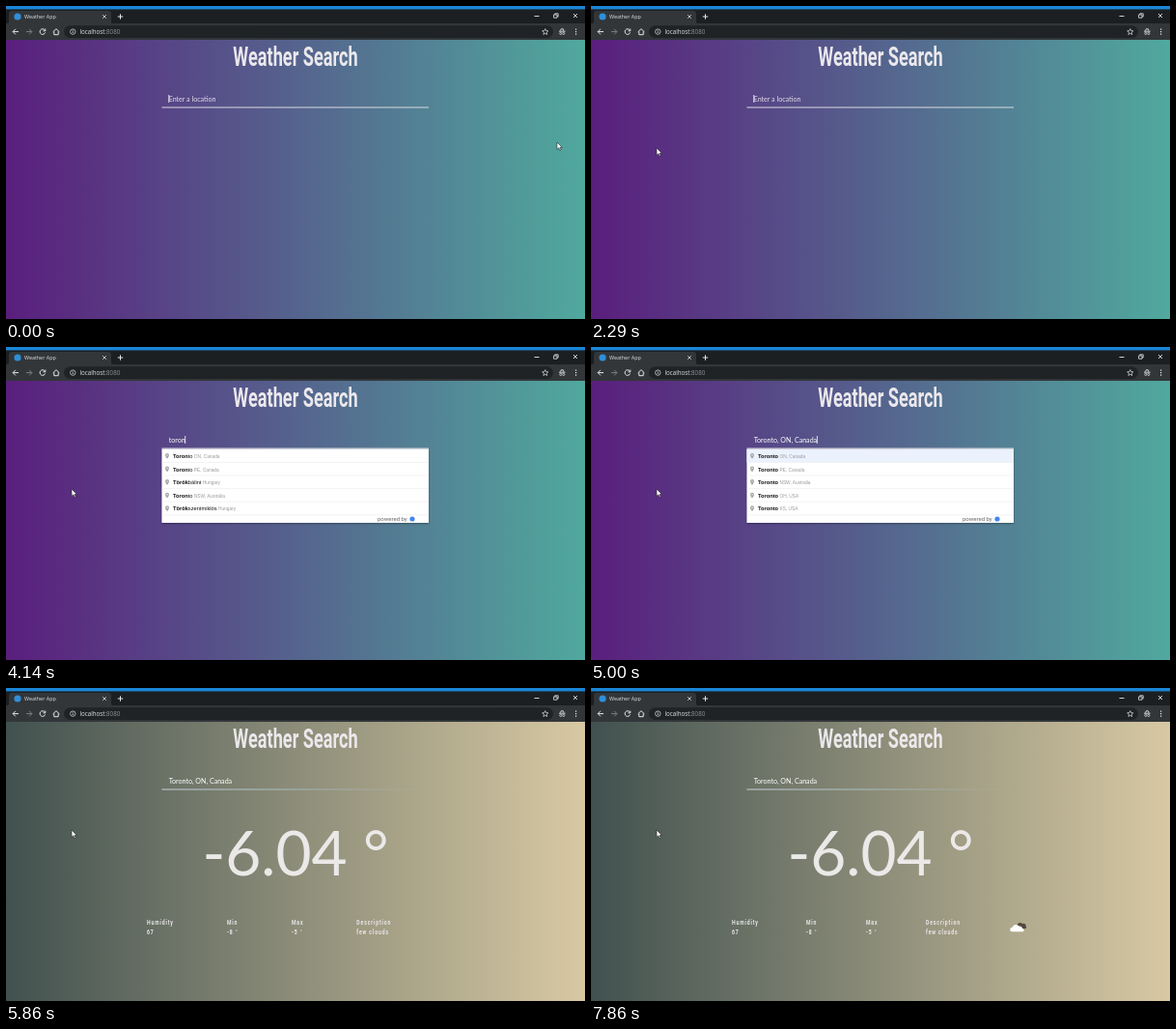
These frames come from a looping animation (600 by 324 pixels, 8 s). An HTML page:

```html
<!DOCTYPE html>
<html lang="en">
<head>
<meta charset="utf-8">
<title>Weather App</title>
<style>
html, body { margin: 0; width: 100%; height: 100%; overflow: hidden; background: #1c2023; }
svg { display: block; width: 100%; height: 100%; }
text { white-space: pre; }
.lato { font-family: Lato, sans-serif; fill: #fff; }
.ui { font-family: "Open Sans", sans-serif; fill: #dfe1e4; }
.list { font-family: "Liberation Sans", Arial, sans-serif; font-size: 5.7px; fill: #111; }
.list .hit { font-weight: 700; }
.list .more { font-size: 4.8px; fill: #999; }
.slim { font-family: Roboto, sans-serif; font-weight: 700; fill: #ebe8ec; }
.icon { fill: none; stroke: #e4e6e8; stroke-width: 1; }
</style>
</head>
<body>
<svg viewBox="0 0 600 324" preserveAspectRatio="none">
  <defs>
    <linearGradient id="dusk"><stop stop-color="#5a1e7d"/><stop offset="1" stop-color="#50a99e"/></linearGradient>
    <linearGradient id="sand"><stop stop-color="#41514f"/><stop offset="1" stop-color="#d8c9a3"/></linearGradient>
    <linearGradient id="rule" gradientUnits="userSpaceOnUse" x1="161" y1="0" x2="438" y2="0">
      <stop stop-color="#c6d2d6"/><stop offset=".45" stop-color="#a9bcc2"/><stop offset="1" stop-color="#a9bcc2" stop-opacity="0"/>
    </linearGradient>
    <filter id="shade" x="-5%" y="-10%" width="110%" height="125%">
      <feDropShadow dx="0" dy="1" stdDeviation="1" flood-opacity=".35"/>
    </filter>
  </defs>

  <rect id="page" y="34" width="600" height="290" fill="url(#dusk)"/>

  <!-- browser frame -->
  <rect width="600" height="19" fill="#1b1f22"/>
  <rect width="600" height="3.4" fill="#1b86d6"/>
  <path d="M1 18.5Q3 18 3 16V8Q3 5 6 5H106Q109 5 109 8V16Q109 18 111 18.5Z" fill="#323639"/>
  <rect y="18" width="600" height="17" fill="#323639"/>
  <rect x="60" y="20.3" width="507" height="12.6" rx="6.3" fill="#202326"/>
  <circle cx="12" cy="11" r="3.6" fill="#2f8fd8"/>
  <text class="ui" x="19" y="13" font-size="5.4">Weather App</text>
  <text class="ui" x="76.5" y="29" font-size="6.2">localhost<tspan fill="#8d9296">:8080</tspan></text>
  <g class="icon">
    <path d="M100.2 9.2l3.6 3.6m0-3.6l-3.6 3.6" stroke-width=".8"/>
    <path d="M118.5 8.3v5.4m-2.7-2.7h5.4"/>
    <path d="M547.5 10.5h5" stroke-width=".9"/>
    <path d="M567.6 9h3.4v3.2h-3.4zM568.8 9V7.8h3.4V11H571" stroke-width=".8"/>
    <path d="M588 8l4 4m0-4l-4 4" stroke-width=".9"/>
    <path d="M13 26.6H7.2m2.7-2.8l-2.8 2.8 2.8 2.8"/>
    <path d="M21 26.6h5.8m-2.7-2.8l2.8 2.8-2.8 2.8" stroke="#7d8185"/>
    <path d="M40.1 24.8A2.8 2.8 0 1 0 40.6 27.4M40.8 23.6v2.2h-2.3"/>
    <path d="M48.6 26.9l3.4-3.2 3.4 3.2M49.8 26.4v3.3h4.4v-3.3"/>
    <circle cx="69.3" cy="26.6" r="2.7" stroke-width=".7"/>
    <path d="M69.3 26.2v1.8m0-3.2v.8" stroke-width=".8"/>
    <path d="M558.8 23.6l.9 2 2.2.2-1.7 1.5.5 2.2-1.9-1.2-1.9 1.2.5-2.2-1.7-1.5 2.2-.2z" stroke-width=".7"/>
    <path d="M573 26.2h6.6M574.6 25.6l.6-1.8h2.2l.6 1.8" stroke-width=".9"/>
    <circle cx="574.8" cy="28.4" r="1.1" stroke-width=".7"/>
    <circle cx="577.8" cy="28.4" r="1.1" stroke-width=".7"/>
    <path d="M590.6 23.6v1.2m0 1.3v1.2m0 1.3v1.2" stroke-width="1.2"/>
  </g>

  <g transform="translate(300 62) scale(.673 1)">
    <text class="slim" text-anchor="middle" font-size="27">Weather Search</text>
  </g>

  <rect id="line" x="161.5" y="104.5" width="276.5" height="1" fill="#d9d9e2"/>
  <text id="entry" class="lato" x="168.7" y="98.6" font-size="7.1"></text>
  <rect id="caret" y="92" width=".8" height="8" fill="#fff"/>

  <g id="drop">
    <rect x="161.5" y="105.5" width="276.5" height="76.5" fill="#fff" filter="url(#shade)"/>
    <rect id="pick" x="161.5" y="106" width="276.5" height="13.4" fill="#ebf2fe"/>
    <g id="rows"></g>
    <text x="385" y="180.2" font-size="6" font-family="Roboto, sans-serif" fill="#666">powered by</text>
    <circle cx="421" cy="178" r="2.6" fill="#4285f4"/>
  </g>

  <g id="report">
    <text class="lato" x="300" y="193.5" text-anchor="middle" font-size="64" style="fill:#ebe9e8">-6.04 °</text>
    <g id="facts"></g>
    <g id="cloud">
      <path d="M441 249a2.6 2.6 0 0 1 1-4.3 3 3 0 0 1 5-.6 2.3 2.3 0 0 1 3.6 2.2 2 2 0 0 1-.8 3z" fill="#53473f"/>
      <path d="M436.4 252.3a2.2 2.2 0 0 1 .2-4.5 4 4 0 0 1 7-1.2 2.6 2.6 0 0 1 3.4 2.2 1.8 1.8 0 0 1 .4 3.5z" fill="#fff"/>
    </g>
  </g>

  <path id="mouse" d="M0 0V7.4L1.8 5.8 3 8.6 4.2 8 3 5.4H5.4Z" fill="#fff" stroke="#222" stroke-width=".6"/>
</svg>

<script>
const $ = id => document.getElementById(id);
const LOOP = 8000, STEP = 1000 / 7, BLINK = 530;
const PICK = 4990, CLOSE = 5280, LOADED = 5850, ICON = 6130;

// when each text appears in the input
const typed = [
  [0, ""], [3130, "t"], [3420, "to"], [3700, "tor"], [3850, "toro"], [3990, "toron"],
  [4280, "toront"], [4420, "toronto"], [PICK, "Toronto, ON, Canada"]
];

// "place|region" suggestions
const lists = [
  [3560, ["Toronto|ON, Canada", "Tokyo|Japan", "Toledo|OH, USA", "Toulouse|France", "Torino|Italy"]],
  [3990, ["Toronto|ON, Canada", "Toronto|PE, Canada", "Törökbálint|Hungary", "Toronto|NSW, Australia", "Törökszentmiklós|Hungary"]],
  [4280, ["Toronto|ON, Canada", "Toronto|PE, Canada", "Toronto|NSW, Australia", "Toronto|OH, USA", "Toronto|KS, USA"]]
];

const facts = [["Humidity", "67"], ["Min", "-8 °"], ["Max", "-5 °"], ["Description", "few clouds"]];
const wide = [146, 229, 296, 363.3], tight = [146, 223, 285, 347];

const latest = (list, t) => list.filter(e => e[0] <= t).pop();
const show = (id, on) => $(id).setAttribute("visibility", on ? "inherit" : "hidden");

$("facts").innerHTML = facts.map(pair => "<g>" + pair.map((s, i) =>
  `<text class="slim" y="${i * 10}" font-size="7.6" letter-spacing="1.3">${s}</text>`).join("") + "</g>").join("");

function row(item, i, hits) {
  const [place, region] = item.split("|"), y = 115 + i * 13.6;
  return `<path d="M161.5 ${y + 4.4}h276.5" stroke="#e6e6e6" stroke-width=".5"/>
    <path d="M167 ${y + .8}q-2-2.6-2-3.9a2 2 0 0 1 4 0q0 1.3-2 3.9z" fill="#a5a5a5"/>
    <circle cx="167" cy="${y - 3.1}" r=".7" fill="#fff"/>
    <text class="list" x="173" y="${y}"><tspan class="hit">${place.slice(0, hits)}</tspan>${place.slice(hits)}<tspan class="more" dx="1.4">${region}</tspan></text>`;
}

let rowKey = "";
function drawRows(t) {
  const found = latest(lists, t);
  const open = found && t < CLOSE;
  show("drop", open);
  if (!open) return;
  show("pick", t >= PICK);
  const hits = latest(typed, Math.min(t, PICK - 1))[1].length;
  const key = found[0] + ":" + hits;
  if (key !== rowKey) $("rows").innerHTML = found[1].map((s, i) => row(s, i, hits)).join("");
  rowKey = key;
}

function drawEntry(t) {
  const [since, text] = latest(typed, t), entry = $("entry");
  entry.textContent = text || "Enter a location";
  entry.style.fill = text ? "#fff" : "#e2deea";
  const end = text ? entry.getComputedTextLength() : 0;
  $("caret").setAttribute("x", 168.4 + end);
  const age = text ? t - since : t + 110;
  show("caret", age % (2 * BLINK) < BLINK);
}

function drawMouse(t) {
  const p = Math.min(1, Math.max(0, (t - 700) / 1250));
  const u = p * p * (3 - 2 * p), v = 1 - u;
  const bend = (a, b, c) => v * v * a + 2 * u * v * b + u * u * c;
  $("mouse").setAttribute("transform", `translate(${bend(571, 330, 68)} ${bend(141, 400, 147)})`);
}

function drawReport(t) {
  const on = t >= LOADED, icon = t >= ICON;
  $("page").setAttribute("fill", on ? "url(#sand)" : "url(#dusk)");
  $("line").setAttribute("fill", on ? "url(#rule)" : "#d9d9e2");
  show("report", on);
  show("cloud", icon);
  [...$("facts").children].forEach((g, i) =>
    g.setAttribute("transform", `translate(${(icon ? tight : wide)[i]} 245) scale(.673 1)`));
}

function draw(ms) {
  const t = Math.floor(ms % LOOP / STEP + .05) * STEP % LOOP;
  drawMouse(t);
  drawEntry(t);
  drawRows(t);
  drawReport(t);
}

let start;
function tick(now) {
  start ??= now;
  draw(now - start);
  requestAnimationFrame(tick);
}
draw(0);
requestAnimationFrame(tick);
</script>
</body>
</html>
```
